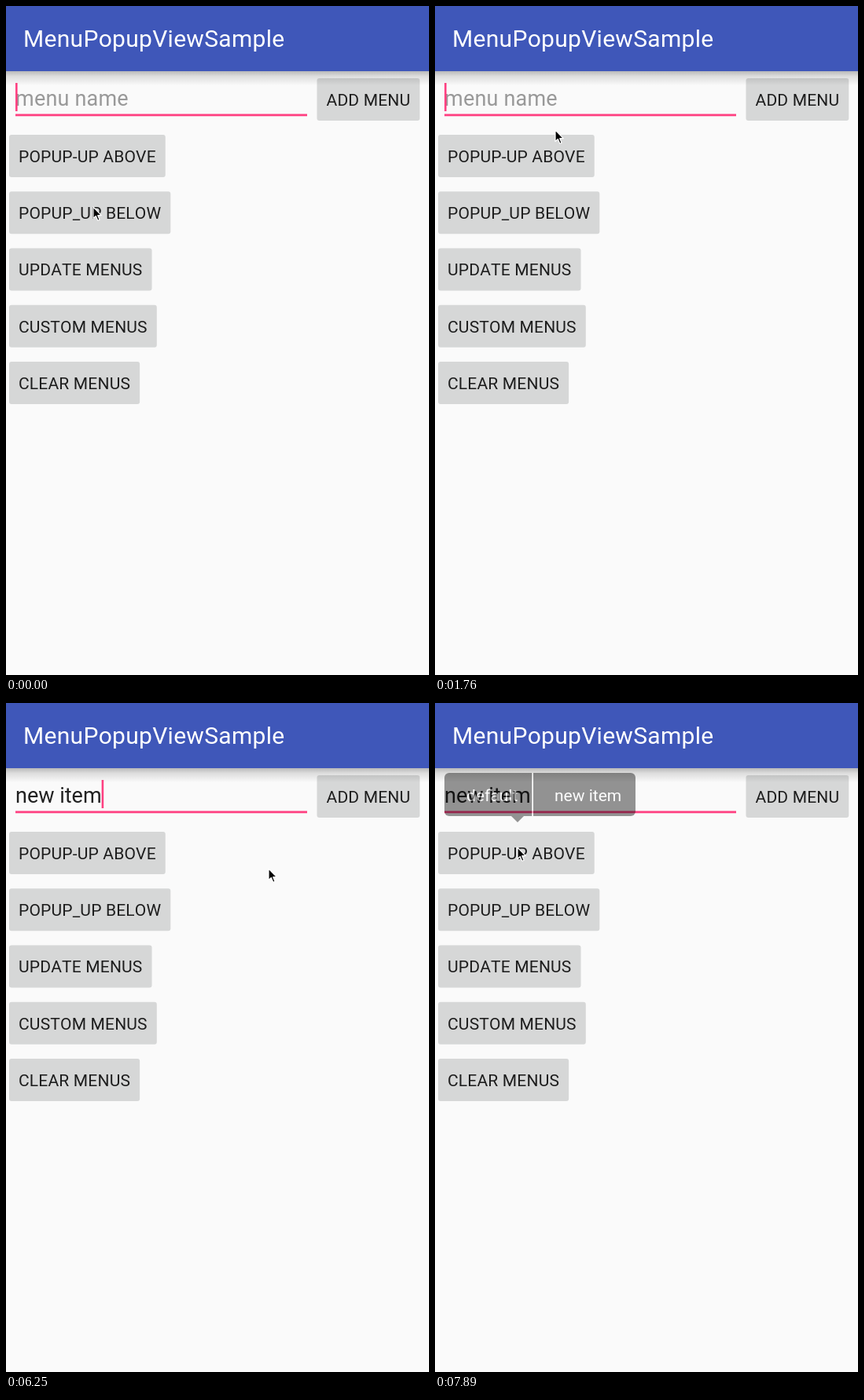
Recreate the animation shown at these times as an HTML page. Size 538 by 852 pixels, loop 8000 ms.

```html
<!DOCTYPE html>
<html lang="en">
<head>
<meta charset="utf-8">
<title>Menu popup demo</title>
<style>
  html, body { margin: 0; width: 100%; height: 100%; overflow: hidden; background: #fafafa; }
  svg { display: block; width: 538px; height: 852px; }
  text { font-family: Roboto, "Noto Sans", sans-serif; font-kerning: none; white-space: pre; }
  .title { font-size: 30px; letter-spacing: .3px; fill: #fff; }
  .label { font-size: 21px; letter-spacing: .18px; fill: #1d1d1d; }
  .field { font-size: 27px; fill: #212121; }
  .hint { fill: #999; letter-spacing: .2px; }
  .item { font-size: 21px; fill: #fff; }
  .btn { fill: #d6d7d7; }
  .btn.down { fill: #bcbdbd; }
  .panel { fill: #000; fill-opacity: .8; }
</style>
</head>
<body>
<svg viewBox="0 0 538 852">
  <defs>
    <linearGradient id="shade" x1="0" y1="0" x2="0" y2="1">
      <stop offset="0" stop-opacity=".26"/>
      <stop offset=".35" stop-opacity=".12"/>
      <stop offset="1" stop-opacity="0"/>
    </linearGradient>
  </defs>
  <rect width="538" height="852" fill="#fafafa"/>
  <g id="buttons"></g>
  <text id="field" class="field" x="12" y="127"></text>
  <rect x="12" y="137.5" width="371" height="2.8" fill="#ff4081"/>
  <rect id="caret" y="98" width="2.6" height="36" fill="#ff4081"/>
  <rect y="83" width="538" height="18" fill="url(#shade)"/>
  <rect width="538" height="83" fill="#3f57b9"/>
  <text class="title" x="22" y="52">MenuPopupViewSample</text>
  <g id="popups"></g>
  <path id="mouse" d="M0 0V14.5l3.3-3 2.5 5.700 2.300-1-2.400-5.500H10.300z" stroke="#fff" stroke-width="1.200" stroke-linejoin="round"/>
</svg>
<script>
const LOOP = 8000, FRAMES = 54, STEP = LOOP / FRAMES;
const BLINK = 500, KEY_GAP = 100;
const $ = id => document.getElementById(id);
const clamp = v => Math.min(1, Math.max(0, v));

function add(parent, tag, attrs, text = '') {
  const el = document.createElementNS('http://www.w3.org/2000/svg', tag);
  for (const key in attrs) el.setAttribute(key, attrs[key]);
  el.textContent = text;
  parent.append(el);
  return el;
}

// A button is as wide as its label plus padding.
function addButton(label, x, y) {
  const box = add($('buttons'), 'rect', { class: 'btn', x, y, height: 54, rx: 3 });
  const text = add($('buttons'), 'text', { class: 'label', x: x + 12, y: Math.round(y + 34.9) }, label);
  box.setAttribute('width', text.getComputedTextLength() + 24);
  return box;
}

// The arrow leaves the panel at edge and ends at tip.
function addPopup(y, edge, tip, width) {
  const group = add($('popups'), 'g', {});
  add(group, 'rect', { class: 'panel', x: 12, y, width, height: 55, rx: 6 });
  add(group, 'path', { class: 'panel', d: `M97 ${edge}H113L105 ${tip}z` });
  add(group, 'text', { class: 'item', x: 40, y: y + 36 }, 'default');
  return group;
}

const addMenu = addButton('ADD MENU', 395.5, 92);
const [popAbove, popBelow] = ['POPUP-UP ABOVE', 'POPUP_UP BELOW', 'UPDATE MENUS', 'CUSTOM MENUS', 'CLEAR MENUS']
  .map((label, i) => addButton(label, 4, 164 + i * 72.25));

const below = addPopup(307, 307, 300, 111);
const above = addPopup(89, 144, 152, 243);
add(above, 'rect', { x: 123.3, y: 89, width: 1.7, height: 55, fill: '#fff' });
add(above, 'text', { class: 'item', x: 152, y: 125 }, 'new item');

// Pointer moves: each follows a quadratic curve from the previous stop.
const easeOut = u => u * (2 - u);
const smooth = u => u * u * (3 - 2 * u);
const home = [111, 256];
const moves = [
  { start: 800, end: 1250, bend: [190, 255], to: [265, 235], ease: smooth },
  { start: 1480, end: 2150, bend: [175, 186], to: [111, 118], ease: easeOut },
  { start: 5800, end: 6550, bend: [310, 310], to: [472, 120], ease: smooth },
  { start: 7000, end: 7600, bend: [300, 300], to: [105, 184], ease: smooth }
];

function mouseAt(t) {
  let pos = home;
  for (const { start, end, bend, to, ease } of moves) {
    if (t < start) break;
    const u = ease(clamp((t - start) / (end - start))), v = 1 - u;
    pos = pos.map((p, i) => v * v * p + 2 * u * v * bend[i] + u * u * to[i]);
  }
  return pos;
}

// Typing comes in short bursts with an even gap between keys.
const keys = [[3100, 'new '], [4580, 'i'], [4900, 'tem']]
  .flatMap(([start, word]) => [...word].map((char, i) => ({ char, time: start + i * KEY_GAP })));

// Focus clicks and key presses restart the caret's blinking.
const wakes = [-390, 1810, ...keys.map(key => key.time)];
const caretOn = t => Math.floor((t - wakes.findLast(w => w <= t)) / BLINK) % 2 === 0;

const presses = [
  { box: popBelow, from: 430, to: 580 },
  { box: addMenu, from: 6650, to: 6950 },
  { box: popAbove, from: 7690, to: 7840 }
];
const fade = (t, start) => clamp((t - start) / 150);

const pen = document.createElement('canvas').getContext('2d');
pen.font = '27px Roboto, "Noto Sans", sans-serif';
pen.fontKerning = 'none';

function render(t) {
  const text = keys.filter(key => key.time <= t).map(key => key.char).join('');
  $('field').textContent = text || 'menu name';
  $('field').classList.toggle('hint', !text);
  $('caret').setAttribute('x', 12 + pen.measureText(text).width);
  $('caret').setAttribute('opacity', +caretOn(t));
  for (const { box, from, to } of presses) box.classList.toggle('down', t >= from && t < to);
  below.setAttribute('opacity', fade(t, 515) - fade(t, 1255));
  above.setAttribute('opacity', fade(t, 7774));
  $('mouse').setAttribute('transform', `translate(${mouseAt(t).map(Math.round)})`);
}

// The screen refreshes in even steps.
const begin = performance.now();
function tick() {
  const t = (performance.now() - begin) % LOOP;
  render(Math.min(FRAMES - 1, Math.floor(t / STEP + .2)) * STEP);
  requestAnimationFrame(tick);
}
tick();
</script>
</body>
</html>
```
